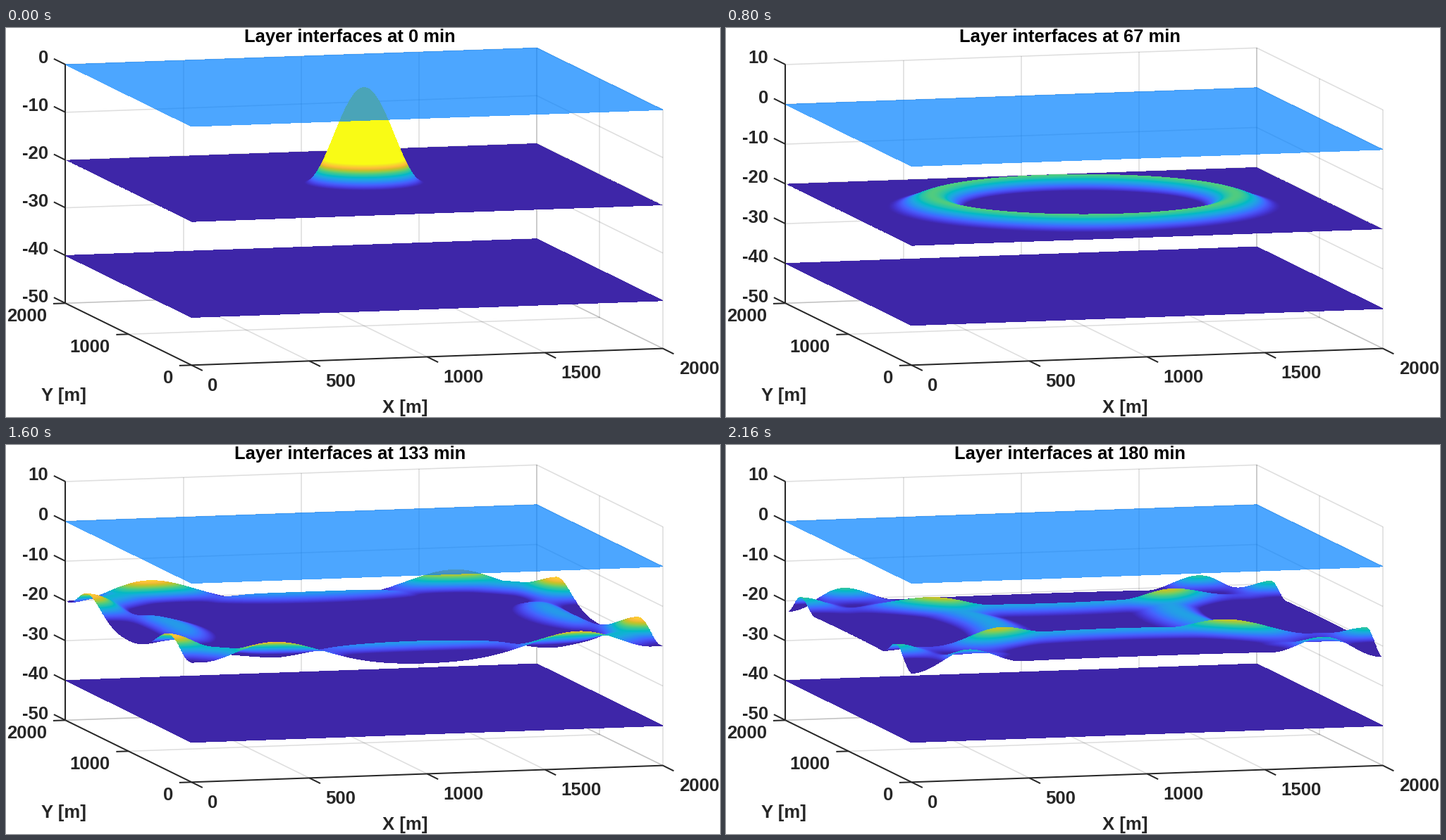
Recreate the animation shown at these times as a matplotlib script. Size 1013x553 px, loop 2240 ms.

```python
import numpy as np
import matplotlib.pyplot as plt
from matplotlib.animation import FuncAnimation
from matplotlib.collections import LineCollection
from matplotlib.colors import LinearSegmentedColormap

W, H, DPI = 1013, 553, 128
FRAMES, STEP = 28, 80
PT = 72 / DPI
INK = "#262626"

PARULA = ("3E26A8 4332CB 4741E5 4852F4 4563FD 3875FE 2E87F7 2797EB 20A5E3 "
          "12B1D6 02BAC3 24C1AE 37C897 57CC7A 81CC59 ABC739 D1BF27 F0BA36 "
          "FEC338 FAD62D F5E924 F9FB15").split()
CMAP = LinearSegmentedColormap.from_list("parula", ["#" + c for c in PARULA])

# Basin and internal wave (metres, minutes)
L = 2000.0
RADIUS, AMP, SPEED = 250.0, 20.0, 60 * np.sqrt(0.02)
REST = -20.0

# Orthographic projection: screen vectors per metre of x and y
X0, Y0 = 263.3, 479.3
XX, XY = 668.6 / L, -23.7 / L
YX, YY = -178.9 / L, -88.0 / L
BOX_H = 339.3


def project(x, y, z, top):
    k = BOX_H / (top + 50)
    return X0 + XX * x + YX * y, Y0 + XY * x + YY * y - k * (z + 50)


# Cosine modes of a centred, compact cosine hump in a closed basin
NX, NY, MODES = 401, 420, 100
xs = np.linspace(0, L, NX)
wave = np.arange(MODES) * np.pi / L
cos_x = np.cos(np.outer(wave, xs))
radius = np.hypot(xs[:, None] - L / 2, xs[None, :] - L / 2)
hump = AMP / 2 * (1 + np.cos(np.pi * np.minimum(radius / RADIUS, 1)))
norm = np.where(np.arange(MODES) == 0, 1, 2) / (NX - 1)
amps = np.outer(norm, norm) * (cos_x @ hump @ cos_x.T)
freq = SPEED * np.hypot(wave[:, None], wave[None, :])

# Sample points: one line of sight per screen column, rows from back to front
ys = np.linspace(L, 0, NY)
cos_y = np.cos(np.outer(ys, wave))
cols = np.arange(83, 934)
ray_x = (cols[None, :] + 0.5 - X0 - YX * ys[:, None]) / XX
inside = (ray_x >= 0) & (ray_x <= L)
pos = np.clip(ray_x / L * (NX - 1), 0, NX - 1.001)
cell = pos.astype(int)
frac = pos - cell
row_id = np.arange(NY)[:, None]


def elevation(minutes):
    grid = cos_y @ (amps * np.cos(freq * minutes)) @ cos_x
    return grid[row_id, cell] * (1 - frac) + grid[row_id, cell + 1] * frac


def render(minutes, top):
    """Height above rest seen at each pixel, NaN where the layer is absent."""
    h = elevation(minutes)
    sy = project(ray_x, ys[:, None], REST + h, top)[1]
    img = np.full((H, W), np.nan)
    for j in range(NY - 1):
        a, b = sy[j], sy[j + 1]
        first = np.ceil(np.minimum(a, b) - 0.5).astype(int)
        count = np.ceil(np.maximum(a, b) - 0.5).astype(int) - first
        count[~(inside[j] & inside[j + 1])] = 0
        for k in range(count.max()):
            s = np.nonzero(count > k)[0]
            r = first[s] + k
            t = (r + 0.5 - a[s]) / (b[s] - a[s])
            img[r, cols[s]] = h[j, s] + t * (h[j + 1, s] - h[j, s])
    return img


fig = plt.figure(figsize=(W / DPI, H / DPI), dpi=DPI, facecolor="white")
ax = fig.add_axes([0, 0, 1, 1])


def lines(segs, alpha, width, z):
    ax.add_collection(LineCollection(segs, colors=INK, alpha=alpha,
                                     linewidths=width * PT, zorder=z))


def plane(z, top, order, **style):
    pts = [project(x, y, z, top) for x, y in ((0, 0), (L, 0), (L, L), (0, L))]
    ax.fill(*zip(*pts), lw=0, antialiased=False, zorder=order, **style)


def label(x, y, s, ha, color=INK, size=25.8):
    ax.text(x, y, s, ha=ha, va="baseline", color=color, fontsize=size * PT,
            family="Liberation Sans", weight="bold", zorder=6)


def draw_box(top, zticks):
    def seg(p, q):
        return [project(*p, top), project(*q, top)]

    xt, yt = np.arange(0, L + 1, 500), np.arange(0, L + 1, 1000)
    grid = [seg((x, L, -50), (x, L, top)) for x in xt[1:]]
    grid += [seg((x, 0, -50), (x, L, -50)) for x in xt[1:]]
    grid += [seg((L, y, -50), (L, y, top)) for y in yt]
    grid += [seg((0, y, -50), (L, y, -50)) for y in yt[1:]]
    grid += [seg((0, L, z), (L, L, z)) for z in zticks]
    grid += [seg((L, 0, z), (L, L, z)) for z in zticks]
    lines(grid, 0.15, 1.6, 1)

    axes = [seg((0, 0, -50), (L, 0, -50)), seg((0, 0, -50), (0, L, -50)),
            seg((0, L, -50), (0, L, top))]
    for x in xt:
        px, py = project(x, 0, -50, top)
        axes.append([(px, py), (px + 15.5, py + 7.7)])
        label(px + 23, py + 36.5, f"{x:.0f}", "left")
    for y in yt:
        px, py = project(0, y, -50, top)
        axes.append([(px, py), (px - 17.5, py + 0.6)])
        label(px - 26.5, py + 26, f"{y:.0f}", "right")
    for z in zticks:
        px, py = project(0, L, z, top)
        axes.append([(px, py), (px - 16.5, py - 8.2)])
        label(px - 24, py - 1.5, str(z), "right")
    lines(axes, 1, 2, 5)


def update(i):
    ax.clear()
    ax.axis("off")
    minutes = i * 20 / 3
    top = 0 if i == 0 else 10
    draw_box(top, range(-50, top + 1, 10))
    plane(-40, top, 2, color=CMAP(0.0))
    ax.imshow(render(minutes, top), cmap=CMAP, vmin=0, vmax=5, aspect="auto",
              extent=(0, W, H, 0), interpolation="nearest", zorder=3)
    plane(0, top, 4, color=(0, 0.5, 1), alpha=0.7)
    label(488, 20, f"Layer interfaces at {minutes:.0f} min", "center",
          "black", 25.5)
    label(534.5, 547, "X [m]", "left")
    label(50.5, 530, "Y [m]", "left")
    ax.set_xlim(0, W)
    ax.set_ylim(H, 0)
    return []


anim = FuncAnimation(fig, update, frames=FRAMES, init_func=lambda: [],
                     interval=STEP, repeat=True, repeat_delay=0)
plt.show()
```
